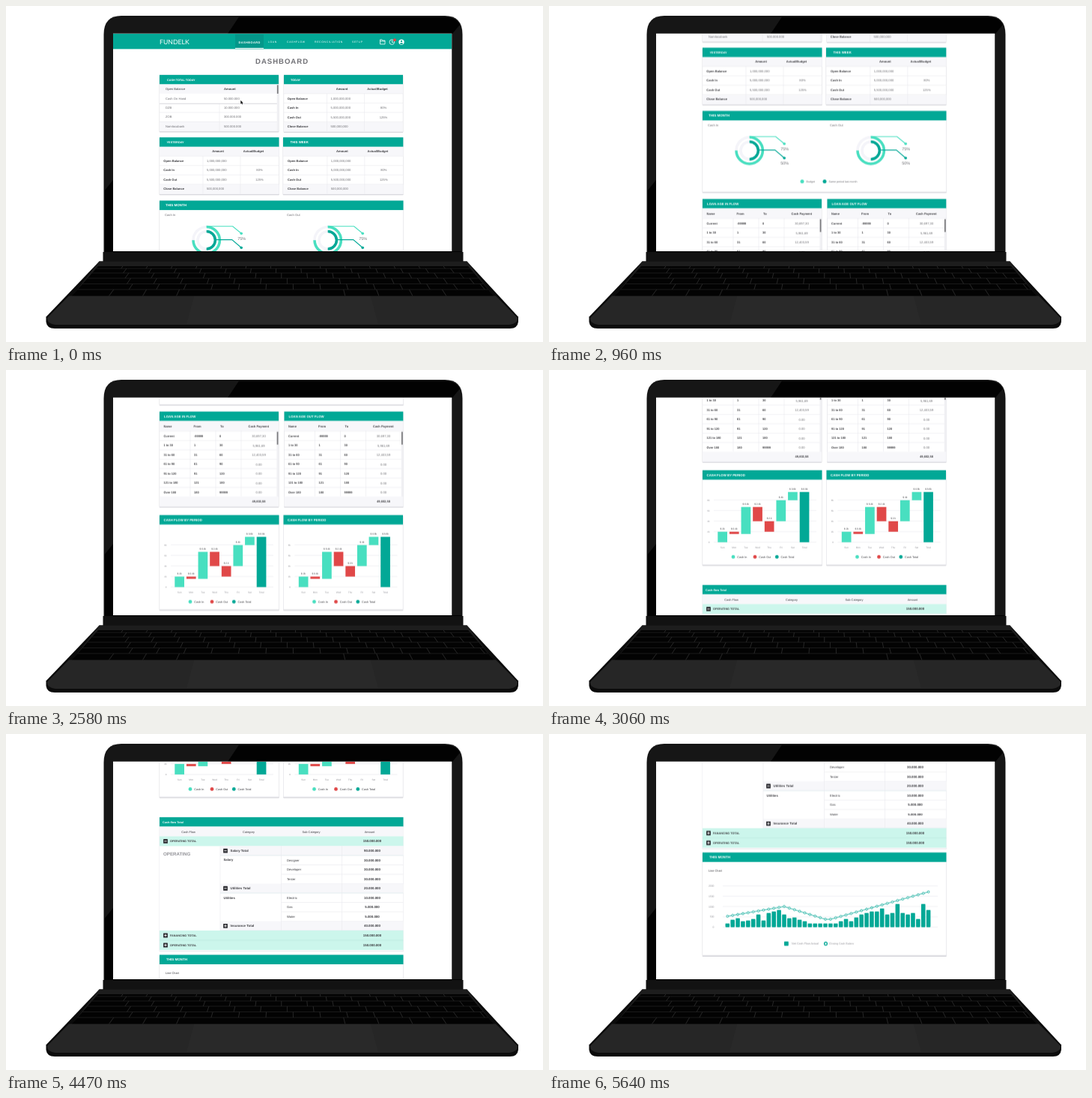
Animation, 717 px wide and 448 px high, one loop 5670 ms. Source, as an HTML page:

```html
<!DOCTYPE html>
<html lang="en">
<head>
<meta charset="utf-8">
<title>Dashboard on a laptop</title>
<style>
  html, body { margin: 0; width: 100%; height: 100%; overflow: hidden; background: #fff; }
  svg { display: block; width: 717px; height: 448px; }
  text { font-family: "Liberation Sans", Arial, sans-serif; fill: #3c3c40; text-rendering: geometricPrecision; }
  .b { font-weight: 700; }
  .m { text-anchor: middle; }
  .e { text-anchor: end; }
  .w { fill: #fff; }
  .g { fill: #707075; }
  .l { fill: #929298; }
  .nav { letter-spacing: .6px; }
  .tab { letter-spacing: .45px; }
  .logo { font-family: Lato, sans-serif; }
  .title { letter-spacing: 1px; }
  #page { animation: scroll 5670ms linear infinite; }
  @keyframes scroll {
    0% { transform: translateY(0); }
    96.86% { transform: translateY(-684.3px); animation-timing-function: cubic-bezier(.333, .667, .667, 1); }
    99.47%, 100% { transform: translateY(-693.5px); }
  }
</style>
</head>
<body>
<svg viewBox="0 0 717 448">
  <defs>
    <clipPath id="screen"><rect x="143" y="37" width="452" height="290"/></clipPath>
    <clipPath id="lid"><path d="M131.500 341V38Q131.500 14.500 154 14.500H586Q608.500 14.500 608.500 38V341Z"/></clipPath>
  </defs>

  <path d="M130.500 341V38Q130.500 13 154 13H586Q609.500 13 609.500 38V341Z" fill="#1c1c1c"/>
  <g clip-path="url(#lid)">
    <rect x="130" y="13" width="480" height="328" fill="#020202"/>
    <path d="M130 13H312L296 37H143V232L130 248ZM610 20L596 37V327H610Z" fill="#161616"/>
  </g>
  <path d="M129.500 328H610.500V341H129.500Z" fill="#121212"/>
  <path d="M124.500 340.500H615.500L684 414.500V421Q683 430 673 430H65Q54.500 430 53.500 421V414.500Z" fill="#0b0b0b"/>
  <path d="M124.500 340.500H615.500L651 387H88Z" fill="#1d1d1d"/>
  <path d="M84 386.500H654L683 416Q683 424 672 425H66Q55 424 55 416Z" fill="#262626"/>
  <path d="M251 387H487L497 424H241Z" fill="#292929"/>
  <g id="keys"></g>

  <rect x="143" y="36.700" width="452.300" height="290.300" fill="#fff"/>
  <g clip-path="url(#screen)"><g id="page"></g></g>
</svg>

<script>
const TEAL = '#02a896', MINT = '#48dfc0', RED = '#e04848', PALE = '#f7f7fa', LINE = '#e9e9ee';
const BAR = 12.6;
const out = [];
const add = s => out.push(s);
const rect = (x, y, w, h, fill, more = '') =>
  add(`<rect x="${x}" y="${y}" width="${w}" height="${h}" fill="${fill}" ${more}/>`);
const text = (x, y, s, cls = '', size = 4.15) =>
  add(`<text x="${x}" y="${y + size * .36}" font-size="${size}" class="${cls}">${s}</text>`);
const path = (d, stroke = LINE, w = .6) =>
  add(`<path d="${d}" fill="none" stroke="${stroke}" stroke-width="${w}"/>`);
const dot = (x, y, r, fill, more = '') => add(`<circle cx="${x}" cy="${y}" r="${r}" fill="${fill}" ${more}/>`);
const hline = (x1, x2, y, c) => path(`M${x1} ${y}H${x2}`, c);
const vline = (x, y1, y2, c) => path(`M${x} ${y1}V${y2}`, c);

function card(x, y, w, h, title, tx, size) {
  rect(x - .4, y + 1, w + .8, h + .5, '#d9d9de', 'rx="1"');
  rect(x, y, w, h, '#fff', `stroke="${LINE}" stroke-width=".5"`);
  rect(x, y, w, BAR, TEAL);
  text(tx, y + 6.4, title, 'b w', size);
}

function topBar() {
  rect(143, 37, 452, 20.500, TEAL);
  rect(306, 38, 38, 19.500, '#04978a');
  rect(306, 56, 38, 1.500, '#e6f7f4');
  text(205, 48.300, 'FUNDELK', 'w logo', 8.700);
  text(310.500, 48.300, 'DASHBOARD', 'b w tab', 3.900);
  [[350, 'LOAN'], [375, 'CASHFLOW'], [412, 'RECONCILIATION'], [462, 'SETUP']]
    .forEach(([x, s]) => text(x, 48.300, s, 'w nav', 3.500));
  path('M499.500 45H502l1 1.200H506V51H499.500ZM499.500 47H506', '#fff', .8);
  path('M515.500 46V48.500H517.500', '#fff', .8);
  dot(515.300, 48.200, 3.300, 'none', 'stroke="#fff" stroke-width=".8"');
  dot(519, 45.300, 2, RED);
  dot(528, 48.200, 3.700, '#fff');
  dot(528, 47, 1.200, TEAL);
  add(`<path d="M525.700 50.300Q528 47.800 530.300 50.300Q528 52.200 525.700 50.300Z" fill="${TEAL}"/>`);
  text(333, 73.500, 'DASHBOARD', 'b g title', 9.550);
}

function cashTotal() {
  card(205, 92, 159, 75, 'CASH TOTAL TODAY', 215, 3.750);
  rect(205, 104.600, 159, 12.400, PALE);
  rect(205, 154.500, 159, 12.500, PALE);
  text(213, 110.700, 'Open Balance');
  text(291, 110.300, 'Amount', 'b', 4.150);
  [142, 154.500].forEach(y => hline(205, 362, y));
  vline(285, 117, 167);
  rect(205, 117.500, 157.500, 13.400, '#dcdce1');
  rect(205, 117, 157.500, 12.800, '#fff');
  [['Cash On Hand', '50.000.000'], ['DZB', '10.000.000'], ['ZOB', '300.000.000'], ['Namlocubank', '500.000.000']]
    .forEach(([name, sum], i) => {
      text(213, 123.200 + 12.450 * i, name, 'g');
      text(291, 123.200 + 12.450 * i, sum, 'g');
    });
  rect(361.700, 104.800, 2.300, 62, '#f0f0f3');
  rect(361.900, 105.500, 1.700, 11.500, '#77777a');
  add('<path d="M313.300 125.800V130.500L314.400 129.600L315.200 131.300L316 130.900L315.300 129.300H316.700Z" fill="#111"/>');
}

function balance(x, y, w, title, tx, size) {
  card(x, y, w, 75.500, title, tx, size);
  rect(x, y + BAR, w, 12.400, PALE);
  rect(x, y + 63, w, 12.500, PALE);
  const right = x + w;
  text(right - 81.500, y + 18.300, 'Amount', 'b m', 4.150);
  text(right - 34, y + 18.300, 'Actual/Budget', 'b m', 4.050);
  const rows = [['Open Balance', '1,000,000,000', ''], ['Cash In', '5,000,000,000', '80%'],
    ['Cash Out', '5,500,000,000', '125%'], ['Close Balance', '500,000,000', '']];
  rows.forEach(([name, sum, share], i) => {
    const cy = y + 31.200 + 12.500 * i;
    hline(x, right, cy - 6.200);
    text(right - 154.200, cy, name, 'b', 4.050);
    text(right - 96.500, cy, sum, 'g');
    text(right - 26, cy, share, 'm g');
  });
  vline(right - 101.500, y + 25, y + 75);
  vline(right - 51.500, y + 25, y + 75);
}

function donut(x, y) {
  const outer = 17.700, inner = 11.700;
  [outer, inner].forEach(r => dot(x, y, r, 'none', 'stroke="#f4f4f9" stroke-width="3.400"'));
  path(`M${x} ${y - outer}A${outer} ${outer} 0 1 1 ${x - outer} ${y}`, MINT, 3.500);
  path(`M${x} ${y - inner}A${inner} ${inner} 0 0 1 ${x} ${y + inner}`, TEAL, 3.500);
  path(`M${x} ${y - 18.500}H${x + 35}L${x + 46.500} ${y - 9}`, MINT, 1.100);
  path(`M${x + 12} ${y - .7}H${x + 34}L${x + 46.500} ${y + 10}`, TEAL, 1.100);
  dot(x + 46.500, y - 9, 1.800, MINT);
  dot(x + 46.500, y + 10, 1.800, TEAL);
  text(x + 47, y - 1.800, '75%', 'm g', 5.400);
  text(x + 47, y + 17, '50%', 'm g', 5.400);
}

function monthRings() {
  card(205, 259.600, 325.500, 108, 'THIS MONTH', 213, 4.500);
  text(212, 279, 'Cash In', 'g', 4.200);
  text(375, 279, 'Cash Out', 'g', 4.200);
  donut(267.700, 312.400);
  donut(429.700, 312.400);
  dot(338, 353.500, 2.500, MINT);
  dot(368, 353.500, 2.500, TEAL);
  text(343.500, 353.500, 'Budget', 'g', 3.600);
  text(373.500, 353.500, 'Same period last month', 'g', 3.600);
}

function loanAge(x, w, title) {
  const y = 377;
  card(x, y, w, 126.500, title, x + 6, 4.350);
  rect(x, y + BAR, w, 12.900, PALE);
  rect(x, y + 113.500, w, 13, PALE);
  [[5.500, 'Name'], [45.500, 'From'], [81, 'To']].forEach(([dx, s]) => text(x + dx, 396.600, s, 'b', 4));
  text(x + 132.300, 396.600, 'Cash Payment', 'b m', 4);
  const rows = [['Current', '-99999', '0', '30,697,30'], ['1 to 30', '1', '30', '5,961,69'],
    ['31 to 60', '31', '60', '12,403,59'], ['61 to 90', '61', '90', '0.00'],
    ['91 to 120', '91', '120', '0.00'], ['121 to 180', '121', '180', '0.00'],
    ['Over 180', '180', '99999', '0.00']];
  rows.forEach(([name, from, to, sum], i) => {
    const cy = 409.400 + 12.500 * i;
    hline(x, x + w, cy - 6.300);
    text(x + 5.500, cy, name, 'b', 3.950);
    text(x + 46, cy, from, 'b', 3.950);
    text(x + 80, cy, to, 'b', 3.950);
    text(x + 132.500, cy + .5, sum, 'm g');
  });
  text(x + 132.500, 496.700, '49,602,58', 'b m', 4);
  [41, 75, 109].forEach(dx => vline(x + dx, y + 25.500, y + 113));
  rect(x + w - 2.500, y + 25.500, 2.500, 88, '#f0f0f3');
  rect(x + w - 2.300, 404, 1.700, 17, '#77777a');
}

function cashFlow(x) {
  const zero = 611;
  card(x, 515, 159.500, 126, 'CASH FLOW BY PERIOD', x + 5.500, 4.350);
  ['0', '2k', '4k', '6k', '8k'].forEach((s, i) => {
    hline(x + 15, x + 152, zero - 14.100 * i);
    text(x + 9.500, zero - 14.100 * i, s, 'e l', 3);
  });
  // day, label, low, high, colour
  const bars = [['Sun', '2k', 0, 14, MINT], ['Mon', '0.4k', 11, 14, RED], ['Tue', '6.4k', 11, 47, MINT],
    ['Wed', '2.4k', 28, 47, RED], ['Thu', '2.k', 14, 28, RED], ['Fri', '4k', 28, 56, MINT],
    ['Sat', '0.8k', 56, 67, MINT], ['Total', '8.8k', 0, 67, TEAL]];
  bars.forEach(([day, label, low, high, fill], i) => {
    const bx = x + 20.300 + 15.630 * i;
    rect(bx, zero - high, 12.700, high - low, fill);
    text(bx + 6.300, zero - high - 4, '$ ' + label, 'm', 3.200);
    text(bx + 6.300, zero + 7, day, 'm l', 3.200);
  });
  [['Cash In', 41, MINT], ['Cash Out', 70, RED], ['Cash Total', 99.300, TEAL]].forEach(([s, dx, fill]) => {
    dot(x + dx, 630.500, 2.400, fill);
    text(x + dx + 5.300, 630.500, s, '', 3.800);
  });
}

function toggle(x, y, open) {
  rect(x - 2.900, y - 2.900, 5.800, 5.800, '#2b2b30', 'rx=".4"');
  path(`M${x - 1.700} ${y}H${x + 1.700}` + (open ? '' : `M${x} ${y - 1.700}V${y + 1.700}`), '#fff', .9);
}

function flowTable() {
  const top = 668;
  rect(204.600, top, 326.300, 179, '#e4e4e9');
  rect(205, top, 325.500, 178, '#fff');
  rect(205, top, 325.500, BAR, TEAL);
  text(209, top + 6.500, 'Cash-flow Total', 'b w', 3.800);
  rect(205, top + BAR, 325.500, 12.900, PALE);
  [[243.500, 'Cash Flow'], [324, 'Category'], [407.500, 'Sub Category'], [485.500, 'Amount']]
    .forEach(([x, s]) => text(x, top + 19.300, s, 'm', 3.950));

  const amount = (y, s) => text(489, y, s, 'b m', 4.400);
  const band = (y, name, open) => {
    rect(205, y - 6.500, 325.500, 13, '#ccf6ec');
    toggle(213, y, open);
    text(219, y, name, 'b', 3.750);
    amount(y, '150.000.000');
  };
  band(700, 'OPERATING TOTAL', true);
  text(210, 716.600, 'OPERATING', 'b l', 6.200);

  // s = subtotal, d = detail
  const rows = [['s', 'Salary Total', '', '90'], ['d', 'Salary', 'Designer', '30'], ['d', '', 'Developer', '30'],
    ['d', '', 'Tester', '30'], ['s', 'Utilities Total', '', '20'], ['d', 'Utilities', 'Electric', '10'],
    ['d', '', 'Gas', '5'], ['d', '', 'Water', '5'], ['s', 'Insurance Total', '', '40']];
  rows.forEach(([kind, name, sub, sum], i) => {
    const y = 712.800 + 12.520 * i;
    if (kind === 's') {
      rect(286, y - 6.250, 244.500, 12.500, PALE);
      toggle(293, y, i < 8);
      text(299.500, y, name, 'b', 4.350);
      hline(286, 530.500, y + 6.250, '#d5e4e8');
    } else {
      text(290.500, y - .3, name, 'b', 4.250);
      text(375, y, sub, '', 4.200);
      hline(367.500, 530.500, y + 6.250);
    }
    amount(y, sum + '.000.000');
  });
  [286, 367.500, 448.500].forEach(x => vline(x, 706.500, 819.200));
  band(825.600, 'FANANCING TOTAL');
  band(838.600, 'OPERATING TOTAL');
  hline(205, 530.500, 832, '#b9eadf');
}

function monthChart() {
  const zero = 951;
  card(205, 851.500, 325.500, 137, 'THIS MONTH', 214, 4.500);
  text(213, 875.500, 'Line Chart', '', 3.900);
  for (let i = 0; i < 5; i++) {
    hline(232, 519, zero - 13.750 * i);
    text(220.500, zero - 13.750 * i, i * 500, 'e l', 3.400);
  }
  const heights = [5, 10, 12, 8, 9, 11, 17, 9, 19, 21, 23, 17, 12, 13, 10, 8, 5, 5, 5, 5,
    5, 5, 8, 11, 8, 13, 17, 19, 21, 21, 25, 17, 19, 31, 19, 17, 19, 11, 31, 23];
  const level = i => i <= 11 ? 14.500 + 13 * i / 11
    : i <= 19 ? 27.500 - 17 * (i - 11) / 8
    : 10.500 + 36.500 * (i - 20) / 19;
  const points = heights.map((h, i) => {
    const x = 238.300 + 6.880 * i;
    rect((x - 2.800).toFixed(2), zero - h, 5.600, h, TEAL, 'rx=".8"');
    return [x.toFixed(2), (zero - level(i)).toFixed(2)];
  });
  path('M' + points.join('L'), TEAL, .8);
  points.forEach(([x, y]) => dot(x, y, 1.400, '#fff', `stroke="${TEAL}" stroke-width=".8"`));
  rect(314, 970.200, 5.800, 5.600, TEAL, 'rx=".8"');
  text(324, 973.200, 'Net Cash Flow Actual', 'l', 3.750);
  dot(369.500, 973, 1.900, '#fff', `stroke="${TEAL}" stroke-width="1.300"`);
  text(374, 973.200, 'Closing Cash Balanc', 'l', 3.600);
}

function keyboard() {
  const top = 347, bottom = 386.500, edges = [347, 350, 356, 363, 370.500, 378, 386.500];
  const px = (u, y) => {
    const k = (y - top) / (bottom - top);
    return (123 - 35 * k + (494 + 69 * k) * u).toFixed(1);
  };
  let rows = '', gaps = '';
  for (let r = 0; r < 6; r++) {
    const y1 = edges[r], y2 = edges[r + 1], count = r < 5 ? 14.5 : 12;
    if (r) rows += `M${px(0, y1)} ${y1}H${px(1, y1)}`;
    for (let k = 1; k < count; k++) {
      if (r === 5 && k > 3 && k < 8) continue;
      const u = (k + r * .22 % 1) / (count + .5);
      gaps += `M${px(u, y1)} ${y1}L${px(u, y2)} ${y2}`;
    }
  }
  return `<path d="M${px(0, top)} ${top}H${px(1, top)}L${px(1, bottom)} ${bottom}H${px(0, bottom)}Z" fill="#030303"/>` +
    `<path d="${rows}" stroke="#1f1f1f" stroke-width=".8"/>` +
    `<path d="${gaps}" stroke="#2c2c2c" stroke-width=".9"/>`;
}

topBar();
cashTotal();
balance(371, 92, 159, 'TODAY', 380, 3.900);
balance(205, 175.300, 159.500, 'YESTERDAY', 214.500, 3.850);
balance(370, 175.300, 160.300, 'THIS WEEK', 379.500, 4.400);
monthRings();
loanAge(205, 159, 'LOAN AGE IN FLOW');
loanAge(371.500, 158.800, 'LOAN AGE OUT FLOW');
cashFlow(205);
cashFlow(370.500);
flowTable();
monthChart();
document.getElementById('page').innerHTML = out.join('');
document.getElementById('keys').innerHTML = keyboard();
</script>
</body>
</html>
```
